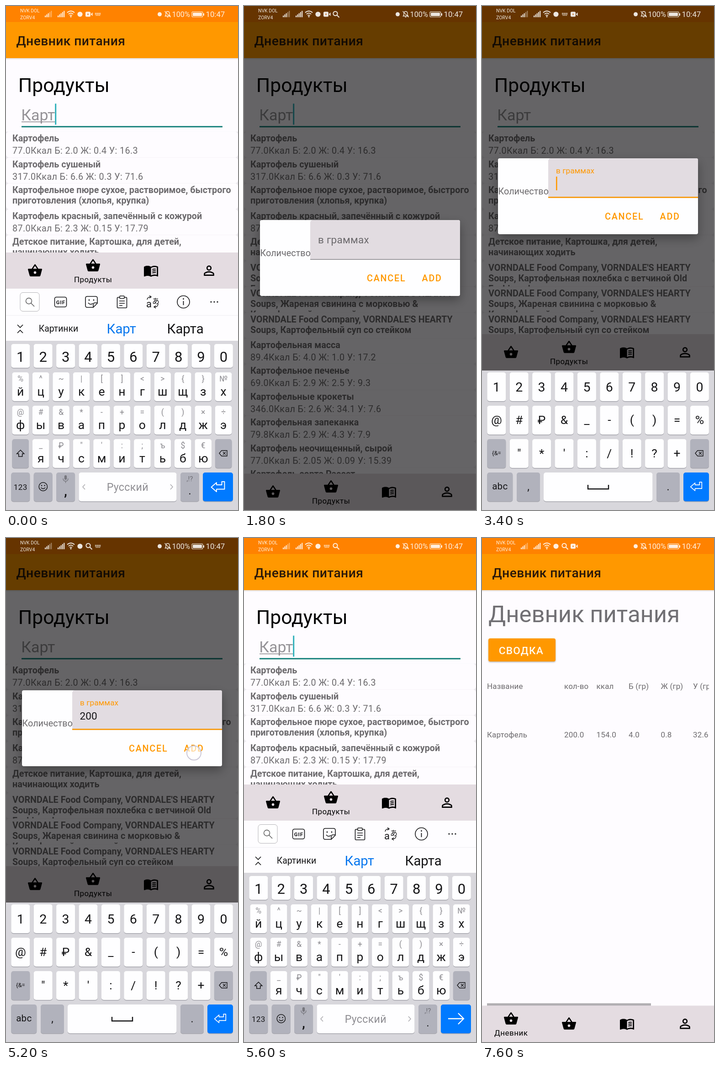
An HTML page that plays this animation: 508x1102 px, repeating every 8000 ms.

```html
<!DOCTYPE html>
<html lang="ru">
<head>
<meta charset="utf-8">
<title>Дневник питания</title>
<style>
html, body { margin: 0; width: 100%; height: 100%; overflow: hidden; background: #fefcff; }
svg { display: block; width: 100%; height: 100%; font-family: Roboto, 'Noto Sans CJK JP', 'Noto Sans CJK', sans-serif; }
</style>
</head>
<body>
<svg id="stage" viewBox="0 0 508 1102"></svg>
<script>
const ORANGE = '#ff9800', GREY = '#6c6a6d', INK = '#151517';

// Drawing helpers: each returns SVG markup
const esc = s => s.replace(/&/g, '&amp;').replace(/</g, '&lt;');
const text = (x, y, size, str, fill = INK, more = '') =>
  `<text x="${x}" y="${y}" font-size="${size}" fill="${fill}" ${more}>${esc(str)}</text>`;
const mid = (x, y, size, str, fill = INK, more = '') =>
  text(x, y, size, str, fill, 'text-anchor="middle" ' + more);
const rect = (x, y, w, h, fill, r = 0, more = '') =>
  `<rect x="${x}" y="${y}" width="${w}" height="${h}" rx="${r}" fill="${fill}" ${more}/>`;
const line = (d, w = 1.6, color = INK, more = '') =>
  `<path d="${d}" fill="none" stroke="${color}" stroke-width="${w}" ${more}/>`;
const ring = (x, y, r, w = 1.6, color = INK) =>
  `<circle cx="${x}" cy="${y}" r="${r}" fill="none" stroke="${color}" stroke-width="${w}"/>`;
const dot = (x, y, r, fill = INK) => `<circle cx="${x}" cy="${y}" r="${r}" fill="${fill}"/>`;
const at = (x, y, body, scale = 1) => `<g transform="translate(${x} ${y}) scale(${scale})">${body}</g>`;
const group = (id, body) => `<g id="${id}">${body}</g>`;
const ls = n => `letter-spacing="${n}"`;
const BOLD = 'font-weight="700"', MEDIUM = 'font-weight="500" ';
const lens = (x, y, r, w, color) =>
  ring(x, y, r, w, color) + line(`M${x + r * .7} ${y + r * .7}l${r * 1.15} ${r * 1.15}`, w, color);

// Product list
const BRAND = "VORNDALE Food Company, VORNDALE'S HEARTY";
const foods = [
  ['Картофель', '77.0Ккал Б: 2.0 Ж: 0.4 У: 16.3'],
  ['Картофель сушеный', '317.0Ккал Б: 6.6 Ж: 0.3 У: 71.6'],
  ['Картофельное пюре сухое, растворимое, быстрого|приготовления (хлопья, крупка)'],
  ['Картофель красный, запечённый с кожурой', '87.0Ккал Б: 2.3 Ж: 0.15 У: 17.79'],
  ['Детское питание, Картошка, для детей,|начинающих ходить'],
  [BRAND + '|Soups, Картофельная похлебка с ветчиной Old|Fashioned'],
  [BRAND + '|Soups, Жареная свинина с морковью &|Картофельной соломкой'],
  [BRAND + '|Soups, Картофельный суп со стейком'],
  ['Картофельная масса', '89.4Ккал Б: 4.0 Ж: 1.0 У: 17.2'],
  ['Картофельное печенье', '69.0Ккал Б: 2.9 Ж: 2.5 У: 9.3'],
  ['Картофельные крокеты', '346.0Ккал Б: 2.6 Ж: 34.1 У: 7.6'],
  ['Картофельная запеканка', '79.8Ккал Б: 2.9 Ж: 4.3 У: 7.9'],
  ['Картофель неочищенный, сырой', '77.0Ккал Б: 2.05 Ж: 0.09 У: 15.39'],
  ['Картофель сорта Рассет', '79.0Ккал Б: 2.1 Ж: 0.1 У: 18.1']
];
const foodRow = ([name, facts], i) => at(0, 274.8 + i * 56.44,
  `<g clip-path="url(#row)">${rect(0, 0, 508, 56.6, '#fefcff', 7)}` +
  name.split('|').map((s, n) => text(14, 21.7 + n * 23.1, 19.76, s, GREY, BOLD)).join('') +
  (facts ? text(14, 48.6, 19.76, facts, GREY, ls(.38)) : '') + '</g>');

// Bottom navigation
const basket = '<path d="M17.21 9l-4.38-6.56c-.19-.28-.51-.42-.83-.42-.32 0-.64.14-.83.43L6.79 9H2c-.55 0-1 .45-1 1 0 .09.01.18.04.27l2.54 9.27c.23.84 1 1.46 1.92 1.46h13c.92 0 1.69-.62 1.93-1.46L23 10c0-.55-.45-1-1-1zM9 9l3-4.4L15 9zm3 8a2 2 0 110-4 2 2 0 010 4z"/>';
const book = '<path d="M21 5c-1.1-.35-2.3-.5-3.5-.5-1.95 0-4.05.4-5.5 1.5-1.45-1.1-3.55-1.5-5.5-1.5S2.45 4.9 1 6v14.65c0 .3.3.5.75.45C3.1 20.45 5 20 6.5 20c1.95 0 4.05.4 5.5 1.5 1.35-.85 3.8-1.5 5.5-1.5 1.65 0 3.35.3 4.75 1.05.4.1.75-.1.75-.45V6c-.6-.45-1.25-.75-2-1zm0 13.5c-1.1-.35-2.3-.5-3.5-.5-1.7 0-4.15.65-5.5 1.5V8c1.35-.85 3.8-1.5 5.5-1.5 1.2 0 2.4.15 3.5.5z"/>' +
  [10.2, 12.9, 15.6].map(y => line(`M14 ${y}q2.5-1 5.5-.5`, 1.4, '#000')).join('');
const person = '<path d="M12 5.9a2.1 2.1 0 110 4.2 2.1 2.1 0 010-4.2m0 9c2.97 0 6.1 1.46 6.1 2.1v1.1H5.9V17c0-.64 3.13-2.1 6.1-2.1M12 4a4 4 0 100 8 4 4 0 000-8zm0 9c-2.67 0-8 1.34-8 4v3h16v-3c0-2.66-5.33-4-8-4z" fill-rule="evenodd"/>';
const nav = (active, label) => rect(0, 0, 508, 80, '#e4dce1') +
  [basket, basket, book, person].map((icon, i) =>
    at(46.6 + 127 * i, (i === active ? 28.5 : 39.6) - 16.9, icon, 1.411)).join('') +
  mid(63.7 + 127 * active, 65, 16.94, label, '#000', ls(.5));

// Keyboards
const DARK = '#b1b2bc', BLUE = '#007aff';
const key = (x, y, w, h = 63, fill = '#fefeff') =>
  rect(x, y + 1.4, w, h, '#a6a6ad', 5) + rect(x, y, w, h, fill, 5);
const back = (x, y) => line(`M${x - 9} ${y}l5-6h12v12h-12zM${x - 1} ${y - 3}l6 6m0-6l-6 6`, 1.4);
const enter = line('M8.500-11H14.500V5.500H-3V11L-14.500 1L-3-9V-4H8.500Z'.replace(/00\b/g, ''), 1.9, '#fff', 'stroke-linejoin="round"');
const arrow = line('M-17 0H17M5-12L17 0L5 12', 2.3, '#fff');
const tens = (str, y, h, base, size) => [...str].map((c, i) => c === ' ' ? '' :
  key(11.3 + 49.4 * i, y, 41, h) + mid(31.8 + 49.4 * i, base, size, c)).join('');
const letters = (main, small, y, first = 0) => [...main].map((c, i) => {
  const x = 31.7 + 44.45 * (i + first);
  return key(x - 18.3, y, 36.6) + mid(x, y + 20, 17.5, small[i], '#8b8a8f') + mid(x, y + 50.5, 26.5, c);
}).join('');

const tools =
  rect(31, 626.5, 42, 41, '#fff', 6, 'stroke="#b4b3b7"') + lens(50, 645, 6.5, 1.4, '#555') +
  rect(106.5, 636.5, 26, 21.5, 'none', 4, `stroke="${INK}" stroke-width="1.6"`) +
  mid(119.8, 651.5, 11.5, 'GIF', INK, BOLD + ' ' + ls(.8)) +
  line('M178 635h18q4 0 4 4v11l-9 9h-13q-4 0-4-4v-16q0-4 4-4zM200 649h-5q-4 0-4 4v6M180 649q5 6 10 1') +
  dot(182, 643, 1.4) + dot(192, 643, 1.4) +
  rect(243.5, 637, 21, 23, 'none', 2, `stroke="${INK}" stroke-width="1.6"`) +
  rect(249, 634, 10, 5.5, '#fff', 1, `stroke="${INK}" stroke-width="1.5"`) +
  line('M248 645h12m-12 5h12m-12 5h7', 1.5) +
  mid(313, 659, 22, 'a') + mid(328, 651, 16, 'あ') +
  line('M309 642q1-6 8-6m-3-3l4 3-4 3M333 651q0 7-8 7m3-3l-4 3 4 3', 1.4) +
  ring(388.5, 647, 13.5) + line('M388.5 645v9', 1.8) + dot(388.5, 640.5, 1.4) +
  [449, 456, 463].map(x => dot(x, 647, 1.6)).join('');

const ruKeys = rect(0, 618, 508, 484, '#d8d7dc') + rect(0, 618, 508, 114, '#fefdff') +
  line('M0 676.5H508', 1, '#efeef1') + tools +
  line('M25 697l6 6 6-6M25 715l6-6 6 6', 1.6) +
  text(71.7, 712, 19.4, 'Картинки') + text(220.5, 715.7, 29.4, 'Карт', '#0a78ee') + text(352.5, 715.7, 29.4, 'Карта') +
  tens('1234567890', 739, 52, 777.7, 31) +
  letters('йцукенгшщзх', '%^~|[]<>{}№', 801) +
  letters('фывапролджэ', '@#&*-+=()×÷', 874) +
  letters('ячсмитьбю', '_₽"\':;ъ$€', 947, 1) +
  key(13.4, 947, 36.6, 63, DARK) + line('M31.7 971l8 8h-4v6h-8v-6h-4z', 1.5) +
  key(457.9, 947, 36.6, 63, DARK) + back(476, 978) +
  [11.3, 60.7, 110.1, 382].map(x => key(x, 1020, 41, 63, DARK)).join('') +
  mid(31.8, 1057.5, 17, '123', INK, ls(.4)) +
  ring(81.3, 1051, 9.2, 1.5) + dot(78, 1048.5, 1.3) + dot(84.6, 1048.5, 1.3) + line('M76.5 1053q4.8 5 9.6 0', 1.4) +
  rect(127.8, 1026, 5.4, 10, '#77777e', 2.7) + line('M125 1033q0 6 5.5 6t5.5-6m-5.5 6v4', 1.3, '#77777e') +
  mid(130.5, 1070, 27, ',', INK, BOLD) +
  key(159.5, 1020, 214) + mid(266.3, 1060, 23.2, 'Русский', '#8f8e93', ls(.3)) +
  line('M173 1046l-5 5.5 5 5.5M360 1046l5 5.5-5 5.5', 1.4, '#a6a5aa') +
  mid(402.5, 1039, 15, ',!?', '#6d6d74') + mid(402.5, 1068, 23, '.') +
  key(431, 1020, 66, 63, BLUE) +
  group('enterIcon', at(464, 1051, enter)) + group('arrowIcon', at(464, 1051, arrow));

const numKeys = rect(0, 797, 508, 305, '#d8d7dc') +
  tens('1234567890', 801, 63, 843, 28.5) +
  tens('@#₽&_-()=%', 874, 63, 914, 26.5) +
  tens(' "*\':/!?+ ', 947, 63, 987, 26.5) +
  key(11.3, 947, 41, 63, DARK) + mid(31.8, 982, 13, '{&=') +
  key(455.9, 947, 41, 63, DARK) + back(476, 978) +
  key(11.3, 1020, 56, 63, DARK) + mid(39.3, 1057, 20.5, 'abc', INK, ls(.3)) +
  key(76, 1020, 51, 63, DARK) + mid(101.5, 1059, 23, ',') +
  key(135, 1020, 238.5) + line('M232 1047v9h45v-9', 2.4) +
  key(382, 1020, 51, 63, DARK) + mid(407.5, 1059, 23, '.') +
  key(441, 1020, 56, 63, BLUE) + at(469, 1050.5, enter, .85);

// Status bar
const bars = (x, last) => [0, 1, 2, 3, 4].map(i =>
  rect(x + 3.3 * i, 21 - 2.6 * i, 2.1, 3.5 + 2.6 * i, '#fff', 0, i > last ? 'opacity=".45"' : '')).join('');
const slotIcons = {
  cam: rect(-7.5, -5.5, 11, 11, '#fff', 2.5) + '<path d="M4 0l4-4v8z" fill="#fff"/>' + dot(-2, 0, 1.5, '#d8843a'),
  kbd: line('M-6.5-2.2h13M-6.5 0h13M-5 2.5h10', 1.5, '#fff', 'stroke-dasharray="1.8 .8"'),
  find: lens(-1.5, -1.5, 4.6, 2, '#fff')
};
const status = '<g opacity=".88">' +
  text(31, 14, 10.4, 'NVK DOL', '#fff') + text(31, 29, 10.5, 'ZORV4', '#fff') +
  bars(85, 2) + bars(113, 4) +
  line('M134 14.5q8-7 16 0M136.8 17.8q5.2-4.6 10.4 0M139.5 21q2.5-2.3 5 0', 1.7, '#fff') + dot(142, 23.2, 1.5, '#fff') +
  dot(162, 18, 5.6, '#fff') +
  Object.entries(slotIcons).map(([id, body]) => group(id, body)).join('') +
  dot(336.5, 18, 4.5, '#fff') +
  line('M348.5 22h11l-1.5-2v-4q0-4-4-4t-4 4v4zM352.5 24.2h3M347.5 11.5l13 13', 1.4, '#fff') +
  text(363.5, 24, 16.3, '100%', '#fff') +
  rect(407, 12.5, 24, 11.5, 'none', 2.5, 'stroke="#fff" stroke-width="1.2"') + rect(409, 14.5, 20, 7.5, '#fff', 1) + rect(432, 16, 2, 5, '#fff') +
  text(437.5, 24, 16.8, '10:47', '#fff') + '</g>';

// Pages
const food = text(26.8, 188.3, 42.7, 'Продукты', '#000') +
  text(33.2, 250, 33.9, 'Карт', '#959397') +
  group('under', rect(34, 252.5, 73, 1.7, '#959397')) +
  rect(34, 262.5, 440, 2.8, '#0a7b74') + group('caret', rect(107.2, 213.5, 3, 46, '#2fb0ba')) +
  rect(0, 274.8, 508, 830, '#ece9ee') + foods.map(foodRow).join('') +
  group('nav', nav(1, 'Продукты'));

const cols = [11.5, 180.5, 251, 321.5, 392, 462.5];
const cells = (y, list) => list.map((s, i) => text(cols[i] - .5, y, 16.94, s, GREY, ls(.17))).join('');
const diary = rect(0, 114, 508, 988, '#fefcff') + text(14.1, 184, 50.8, 'Дневник питания', '#717074') +
  rect(14, 219.5, 147, 50.5, ORANGE, 4, 'filter="url(#lift)"') +
  text(36.7, 253.5, 22.58, 'СВОДКА', '#fffaf0', MEDIUM + ls(1.25)) +
  `<g clip-path="url(#table)">${cells(330, ['Название', 'кол-во', 'ккал', 'Б (гр)', 'Ж (гр)', 'У (гр)'])}` +
  cells(436, ['Картофель', '200.0', '154.0', '4.0', '0.8', '32.6']) + '</g>' +
  rect(11, 1017.3, 359, 5.5, '#b1afb2') + at(0, 1022.5, nav(0, 'Дневник'));

// Dialog, drawn from its own top edge
const dialog = rect(35, 0, 438, 166, '#fefeff', 4, 'filter="url(#drop)"') +
  '<path d="M145 86V6q0-6 6-6H469q4 0 4 4V86z" fill="#e2dce1"/>' +
  text(35.5, 79, 19.75, 'Количество', GREY, ls(.05)) +
  group('idle', text(162, 51, 22.6, 'в граммах', GREY, ls(.2)) + rect(145, 85.5, 328, 1.3, '#77757a')) +
  group('focus', text(162, 32.5, 17.1, 'в граммах', ORANGE, ls(.1)) + rect(145, 84, 328, 2.8, '#f69a10')) +
  text(161.5, 64, 22.6, '', INK, 'id="amount"') + group('gramCaret', rect(0, 40, 2.6, 30, ORANGE)) +
  text(269, 134, 19.75, 'CANCEL', ORANGE, MEDIUM + ls(1.76)) + text(389.5, 134, 19.75, 'ADD', ORANGE, MEDIUM + ls(1.76));

const stage = document.getElementById('stage');
stage.innerHTML = `<defs>
<clipPath id="row"><rect width="508" height="56.4"/></clipPath>
<clipPath id="table"><rect y="300" width="497" height="160"/></clipPath>
<filter id="drop" x="-20%" y="-30%" width="140%" height="170%"><feDropShadow dx="0" dy="9" stdDeviation="11" flood-opacity=".32"/></filter>
<filter id="lift" x="-10%" y="-20%" width="120%" height="150%"><feDropShadow dx="0" dy="1.5" stdDeviation="1.5" flood-opacity=".3"/></filter>
<linearGradient id="edge" x2="0" y2="1"><stop stop-color="#000" stop-opacity=".12"/><stop offset="1" stop-color="#000" stop-opacity="0"/></linearGradient>
</defs>` + rect(0, 0, 508, 1102, '#fefcff') + group('food', food) + group('diary', diary) +
  rect(0, 0, 508, 36, '#ff8200') + rect(0, 35, 508, 79, ORANGE) + rect(0, 114, 508, 4, 'url(#edge)') +
  text(22.5, 86, 28.2, 'Дневник питания', '#2a1809', MEDIUM + ls(.38)) +
  group('dim', rect(0, 0, 508, 1102, '#000')) + group('dialog', dialog) +
  group('ru', ruKeys) + group('num', numKeys) + status +
  group('touch', '<circle r="15.5" fill="#fff" fill-opacity=".62" stroke="#cbc7d6" stroke-width="2"/>');

// Each step changes part of the state; keyboards are given by how far they stand above the bottom edge
const steps = [
  [0, { caret: 1, under: 1, ru: 484, num: 0, navY: 539, dim: 0, dialog: 0, dialogY: 468, focus: 0, amount: '',
        gramCaret: 0, touch: null, arrow: 0, slots: ['cam', 'kbd'], diary: 0 }],
  [200, { caret: 0 }],
  [600, { caret: 1 }],
  [1000, { caret: 0 }],
  [1200, { touch: [69, 289, .5] }],
  [1400, { touch: [69, 289, 1] }],
  [1600, { touch: null, caret: 1, under: 0, ru: 200, navY: 1022.5, dim: .35, dialog: .6 }],
  [1800, { ru: 0, dim: .6, dialog: 1, slots: ['cam', 'find'] }],
  [2000, { caret: 0 }],
  [2200, { touch: [290, 515, 1] }],
  [2400, { touch: null, focus: 1, gramCaret: 1 }],
  [2600, { num: 170, navY: 717.5, dialogY: 380 }],
  [2800, { num: 305, dialogY: 333, slots: ['kbd', 'cam'] }],
  [3000, { gramCaret: 0 }],
  [3400, { gramCaret: 1 }],
  [4000, { gramCaret: 0, touch: [81, 845, 1] }],
  [4200, { touch: null, amount: '2', gramCaret: 1 }],
  [4400, { touch: [474, 845, 1] }],
  [4600, { touch: null, amount: '20' }],
  [4800, { touch: [474, 845, 1] }],
  [5000, { touch: null, amount: '200' }],
  [5200, { gramCaret: 0, touch: [411.5, 470, 1], slots: ['find', 'kbd'] }],
  [5400, { touch: null, dim: .25, dialog: .4 }],
  [5600, { dim: 0, dialog: 0, num: 0, ru: 484, navY: 539, caret: 1, under: 1, arrow: 1, slots: ['kbd', 'find'] }],
  [5800, { arrow: 0 }],
  [6000, { caret: 0 }],
  [6400, { caret: 1 }],
  [6800, { caret: 0, touch: [63, 578, 1] }],
  [7000, { touch: null, diary: 1, ru: 200, slots: ['find', 'cam'] }],
  [7200, { ru: 0 }]
];

const el = id => document.getElementById(id);
const alpha = (id, v) => {
  el(id).setAttribute('opacity', +v);
  el(id).setAttribute('display', v ? 'inline' : 'none');
};
const move = (id, x, y) => el(id).setAttribute('transform', `translate(${x} ${y})`);

function draw(time) {
  const s = Object.assign({}, ...steps.filter(([t]) => t <= time).map(([, change]) => change));
  for (const id of ['caret', 'under', 'dim', 'dialog', 'focus', 'gramCaret', 'diary']) alpha(id, s[id]);
  alpha('ru', s.ru > 0);
  alpha('num', s.num > 0);
  alpha('food', !s.diary);
  alpha('idle', !s.focus);
  alpha('arrowIcon', s.arrow);
  alpha('enterIcon', !s.arrow);
  move('ru', 0, 484 - s.ru);
  move('num', 0, 305 - s.num);
  move('nav', 0, s.navY);
  move('dialog', 0, s.dialogY);
  el('amount').textContent = s.amount;
  move('gramCaret', 162 + 12.7 * s.amount.length, 0);
  for (const id in slotIcons) {
    const slot = s.slots.indexOf(id);
    alpha(id, slot >= 0);
    move(id, 181.5 + 20 * slot, 18);
  }
  alpha('touch', s.touch ? s.touch[2] : 0);
  if (s.touch) move('touch', s.touch[0], s.touch[1]);
}

const LOOP = 8000, TICK = 200, start = performance.now();
let shown = -1;
function loop() {
  const time = Math.floor((performance.now() - start) % LOOP / TICK) * TICK;
  if (time !== shown) draw(shown = time);
  requestAnimationFrame(loop);
}
loop();
</script>
</body>
</html>
```
